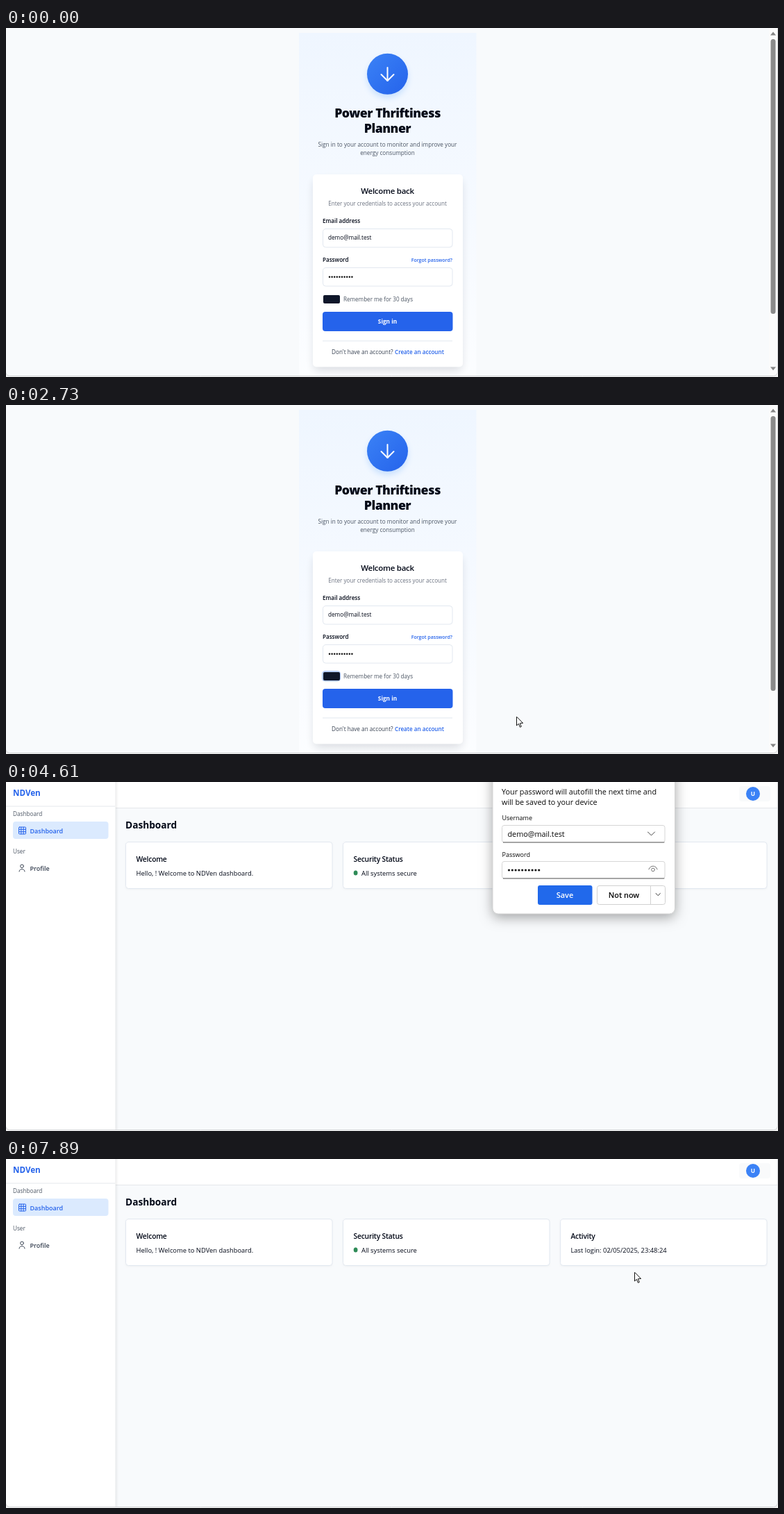
Animation, 1112 px wide and 503 px high, one loop 8 s. Source, as an HTML page with a canvas:

```html
<!DOCTYPE html>
<html lang="en">
<head>
<meta charset="utf-8">
<title>Sign in and dashboard</title>
<style>
  html, body { margin: 0; width: 100%; height: 100%; overflow: hidden; background: #f3f3f3; }
  canvas { display: block; }
</style>
</head>
<body>
<canvas id="stage" width="1112" height="503"></canvas>
<script>
const ctx = document.getElementById('stage').getContext('2d');
const LOOP = 8000;
const BRAND = 'NDVen';
const EMAIL = 'demo@mail.test';
const BLUE = '#2563eb', INK = '#020817', SLATE = '#4b5563', LINE = '#e2e8f0', PAGE = '#f8fafc';

// Pointer strokes: start, end, number of steps, waypoints
const strokes = [
  { from: 990, to: 1720, steps: 12, path: [[545, 500], [530, 440], [515, 400], [507, 432]] },
  { from: 1990, to: 2730, steps: 12, path: [[507, 432], [507, 432], [600, 445], [735, 449]] },
  { from: 2800, to: 3560, steps: 12, path: [[735, 449], [714, 395], [714, 395]] },
  { from: 4400, to: 4610, steps: 4, path: [[735, 350], [820, 190], [934, 6], [934, -30]] },
  { from: 4980, to: 5770, steps: 13, path: [[1083, 2], [1000, 50], [947, 95], [1027, 122]] },
  { from: 5820, to: 6540, steps: 11, path: [[1027, 122], [980, 95], [936, 63], [940, 66]] },
  { from: 6630, to: 7280, steps: 11, path: [[940, 66], [947, 100], [905, 163]] }
];
const clicks = [1990, 7560];
const CLICK_TIME = 200;
const BLANK_AT = 3200, DASH_AT = 3630;

const clamp = v => Math.max(0, Math.min(1, v));
const stepped = (t, from, to, steps) =>
  clamp(Math.floor((t - from) / (to - from) * (steps - 1) + 1e-6) / (steps - 1));

function pointerAt(t) {
  const s = strokes.filter(s => s.from <= t).pop();
  if (!s) return null;
  const u = stepped(t, s.from, s.to, s.steps) * (s.path.length - 1);
  const i = Math.min(Math.floor(u), s.path.length - 2);
  const [a, b] = [s.path[i], s.path[i + 1]];
  return { x: a[0] + (b[0] - a[0]) * (u - i), y: a[1] + (b[1] - a[1]) * (u - i) };
}

const inside = (p, x, y, w, h) => p && p.x >= x && p.x <= x + w && p.y >= y && p.y <= y + h;

function text(str, x, y, size, color, { weight = 400, align = 'left', track = 0 } = {}) {
  ctx.font = `${weight} ${size}px "Open Sans", "Noto Sans", sans-serif`;
  ctx.letterSpacing = track + 'px';
  ctx.textAlign = align;
  ctx.fillStyle = color;
  ctx.fillText(str, x, y);
}

function box(x, y, w, h, r, fill, stroke) {
  ctx.beginPath();
  ctx.roundRect(x, y, w, h, r);
  ctx.fillStyle = fill;
  ctx.fill();
  if (stroke) {
    ctx.strokeStyle = stroke;
    ctx.lineWidth = 1;
    ctx.stroke();
  }
}

function withShadow(color, blur, y, paint) {
  ctx.save();
  ctx.shadowColor = color;
  ctx.shadowBlur = blur;
  ctx.shadowOffsetY = y;
  paint();
  ctx.restore();
}

function rect(x, y, w, h, fill) {
  ctx.fillStyle = fill;
  ctx.fillRect(x, y, w, h);
}

function disc(x, y, r, fill, ry = r) {
  ctx.beginPath();
  ctx.ellipse(x, y, r, ry, 0, 0, 7);
  ctx.fillStyle = fill;
  ctx.fill();
}

function line(points, color, width = 1) {
  ctx.beginPath();
  points.forEach(([x, y]) => ctx.lineTo(x, y));
  ctx.strokeStyle = color;
  ctx.lineWidth = width;
  ctx.lineCap = ctx.lineJoin = 'round';
  ctx.stroke();
}

function dots(x, y, gap, r) {
  for (let i = 0; i < 10; i++) disc(x + i * gap, y, r, '#111');
}

function gradient(x0, y0, x1, y1, a, b) {
  const g = ctx.createLinearGradient(x0, y0, x1, y1);
  g.addColorStop(0, a);
  g.addColorStop(1, b);
  return g;
}

function triangle(x, y, dir) {
  ctx.beginPath();
  ctx.moveTo(x - 4, y + 2.5 * dir);
  ctx.lineTo(x + 4, y + 2.5 * dir);
  ctx.lineTo(x, y - 2.5 * dir);
  ctx.fillStyle = '#858585';
  ctx.fill();
}

function drawLogin(t, pointer) {
  const mid = 549.5;
  const center = { align: 'center' };
  rect(422, 7, 255.5, 494, gradient(0, 7, 0, 620, '#eff6ff', '#ffffff'));

  withShadow('rgba(96,165,250,.28)', 9, 5, () =>
    disc(mid, 66.3, 29.5, gradient(520, 37, 579, 96, '#3b82f6', BLUE)));
  line([[mid, 57], [mid, 76]], '#fff', 2);
  line([[540.5, 67], [mid, 76], [558.5, 67]], '#fff', 2);

  const heading = { weight: 800, align: 'center', track: -0.5 };
  text('Power Thriftiness', mid, 128.5, 17.7, INK, heading);
  text('Planner', mid, 150.5, 17.7, INK, heading);
  text('Sign in to your account to monitor and improve your', mid, 171, 8.2, SLATE, center);
  text('energy consumption', mid, 183.3, 8.2, SLATE, center);

  withShadow('rgba(15,23,42,.14)', 13, 7, () => box(444, 213, 212, 273.5, 5, '#fff'));
  box(442, 211, 216, 277.5, 5, '#fff');
  text('Welcome back', mid, 238.5, 11.5, INK, { weight: 600, align: 'center', track: -0.28 });
  text('Enter your credentials to access your account', mid, 256, 8.1, '#6b7280', center);

  text('Email address', 456, 280.5, 8.1, INK, { weight: 600 });
  box(456.5, 289.5, 186.5, 26.5, 4, '#fff', LINE);
  text(EMAIL, 464, 305, 8.2, INK);

  text('Password', 456, 337, 8.1, INK, { weight: 600 });
  text('Forgot password?', 643, 337, 7, BLUE, { weight: 600, align: 'right' });
  box(456.5, 345.5, 186.5, 26.5, 4, '#fff', LINE);
  dots(466, 358.8, 3.6, 1.25);

  if (t >= clicks[0]) box(455.5, 383.5, 26, 14.5, 4, '#c9dcfb', '#a9c5f7');
  box(457, 385, 24, 12, 2, '#0f172a');
  text('Remember me for 30 days', 486, 393.7, 8.1, SLATE);

  const hover = inside(pointer, 456, 409, 187, 28);
  box(456, 409, 187.5, 28, 4, hover ? '#1d4ed8' : BLUE);
  if (hover && t >= clicks[0]) box(456.5, 409.5, 186.5, 27, 4, '#1d4ed8', '#7d9df0');
  text('Sign in', mid, 426, 8.3, '#fff', { weight: 700, align: 'center' });

  rect(456, 450.5, 187, 1, LINE);
  text('Don\'t have an account?', 469, 470, 8.2, '#374151');
  text('Create an account', 560, 470, 8.1, BLUE, { weight: 600 });

  rect(1099, 0, 12, 501, '#fbfbfb');
  box(1101.5, 16, 7, 396, 3.5, '#8a8a8a');
  triangle(1105, 8, 1);
  triangle(1105, 491, -1);
}

function gridIcon(x, y) {
  box(x, y, 10, 10, 1, 'rgba(0,0,0,0)', BLUE);
  for (const d of [3.33, 6.67]) {
    line([[x + d, y], [x + d, y + 10]], BLUE);
    line([[x, y + d], [x + 10, y + d]], BLUE);
  }
}

function personIcon(x, y) {
  ctx.strokeStyle = '#374151';
  ctx.lineWidth = 1;
  ctx.beginPath();
  ctx.arc(x, y - 2.7, 2.3, 0, 7);
  ctx.stroke();
  ctx.beginPath();
  ctx.moveTo(x - 4, y + 5);
  ctx.bezierCurveTo(x - 4, y + 0.3, x + 4, y + 0.3, x + 4, y + 5);
  ctx.stroke();
}

function card(x, title, body, indent = 0) {
  withShadow('rgba(0,0,0,.05)', 2, 1, () => box(x + 0.5, 86.5, 297.5, 67, 4, '#fff'));
  box(x + 0.5, 86.5, 297.5, 67, 4, '#fff', LINE);
  text(title, x + 15.5, 115, 10.3, INK, { weight: 600, track: -0.2 });
  text(body, x + 15.5 + indent, 135, 9.4, INK);
}

function drawDashboard() {
  rect(158, 0, 953, 37.5, '#fff');
  rect(158, 37, 953, 1, '#e5e7eb');
  rect(157, 0, 5, 501, gradient(157, 0, 162, 0, 'rgba(0,0,0,.08)', 'rgba(0,0,0,0)'));
  rect(0, 0, 157.5, 501, '#fff');
  rect(0, 34.5, 157, 1, '#e5e7eb');

  text(BRAND, 10, 20.3, 11.6, BLUE, { weight: 700 });
  text('Dashboard', 10, 49, 8.2, SLATE);
  box(10, 57, 137.5, 25, 4, '#dbeafe');
  gridIcon(18.5, 65);
  text('Dashboard', 34.5, 73.5, 9, BLUE, { weight: 600 });
  text('User', 10, 103, 8.2, SLATE);
  personIcon(23, 124);
  text('Profile', 34.5, 127.5, 9, '#374151', { weight: 600 });

  box(1056, 6, 45, 22, 4, '#f9fafb');
  disc(1076, 17, 10, '#3b82f6');
  text('U', 1076, 20.2, 8.3, '#fff', { weight: 700, align: 'center' });

  text('Dashboard', 172, 67, 13.7, INK, { weight: 700 });
  card(172, 'Welcome', `Hello, ! Welcome to ${BRAND} dashboard.`);
  card(485, 'Security Status', 'All systems secure', 11.5);
  disc(503.6, 131, 2.9, '#2e8b57', 3.5);
  card(798, 'Activity', 'Last login: 02/05/2025, 23:48:24');
}

function field(y) {
  box(714.5, y, 234.5, 24.5, 3, '#fff', '#d6d6d6');
  line([[716, y + 24.5], [948, y + 24.5]], '#616161');
}

function drawPopup(alpha, pressed, hover) {
  ctx.save();
  ctx.globalAlpha = alpha;
  withShadow('rgba(0,0,0,.36)', 18, 5, () => box(701, -20, 262.5, 210, 8, '#fff'));
  box(701, -20, 262.5, 210, 8, '#fff', '#d4d4d4');
  const dark = '#080808';
  text('Your password will autofill the next time and', 714, 17.5, 10.8, dark);
  text('will be saved to your device', 714, 33, 10.8, dark);

  text('Username', 714.5, 55, 9, dark);
  field(62.5);
  text(EMAIL, 722.5, 78.5, 10.8, dark);
  line([[924.5, 72], [929.5, 77], [934.5, 72]], '#444');

  text('Password', 714.5, 108, 9, dark);
  field(114.5);
  dots(724.5, 127, 4.8, 1.6);
  ctx.strokeStyle = '#777';
  ctx.lineWidth = 1;
  ctx.beginPath();
  ctx.arc(932, 127.5, 6.3, Math.PI * 1.08, Math.PI * 1.92);
  ctx.stroke();
  ctx.beginPath();
  ctx.arc(932, 126.5, 2.3, 0, 7);
  ctx.stroke();

  box(766, 149, 78.5, 28, 3, '#2169eb');
  text('Save', 805, 167, 11, '#fff', { weight: 600, align: 'center' });
  box(851.5, 149.5, 98, 27, 3, '#fff', '#d1d1d1');
  if (pressed || hover) rect(852, 150, 76.5, 26, pressed ? '#858585' : '#ededed');
  rect(928, 150, 1, 26, '#d1d1d1');
  text('Not now', 890, 167, 10.9, dark, { weight: 600, align: 'center' });
  line([[936, 160.5], [939.2, 163.7], [942.4, 160.5]], '#333');
  ctx.restore();
}

function outline(points, x, y, stroke) {
  ctx.beginPath();
  points.forEach(([px, py]) => ctx.lineTo(x + px, y + py));
  ctx.closePath();
  ctx.fillStyle = '#fff';
  ctx.fill();
  ctx.strokeStyle = stroke;
  ctx.lineWidth = 1;
  ctx.lineJoin = 'round';
  ctx.stroke();
}

function drawArrow({ x, y }) {
  outline([[0.5, 0.5], [0.5, 13], [3.4, 10.4], [5.4, 15.3], [7.3, 14.5], [5.3, 9.8], [9.2, 9.5]], x, y, '#111');
}

function drawHand({ x, y }) {
  outline([[-1, 1], [1, 1], [1.3, 7], [4, 7.3], [7, 8], [9.5, 9.5], [9.5, 13], [8, 16], [8, 19],
    [0, 19], [-1, 16], [-5, 11.5], [-4, 10], [-1.2, 12]], x, y, '#1e2a5a');
  for (const dx of [1.3, 4, 7]) line([[x + dx, y + 7.5], [x + dx, y + 11]], '#1e2a5a', 0.8);
}

function popupAlpha(t) {
  return t < 7700 ? stepped(t, 3770, 4050, 5) : 1 - stepped(t, 7692, 7890, 4);
}

function draw(t) {
  const pointer = pointerAt(t);
  const click = clicks.find(c => t >= c && t < c + CLICK_TIME);
  const login = t < BLANK_AT;

  rect(0, 0, 1112, 503, '#f3f3f3');
  ctx.save();
  ctx.beginPath();
  ctx.roundRect(-0.5, -10, 1112, 511.5, 6);
  ctx.clip();
  rect(0, 0, 1112, 503, PAGE);
  if (login) drawLogin(t, pointer);
  if (t >= DASH_AT) {
    drawDashboard();
    const alpha = popupAlpha(t);
    if (alpha > 0) drawPopup(alpha, click === clicks[1], inside(pointer, 852, 150, 76, 26));
  }
  ctx.restore();

  ctx.beginPath();
  ctx.roundRect(-0.5, -10, 1112, 511.5, 6);
  ctx.strokeStyle = '#d2d3d5';
  ctx.lineWidth = 1;
  ctx.stroke();

  if (!pointer) return;
  if (click !== undefined) disc(pointer.x, pointer.y, 10, 'rgba(238,232,0,.55)');
  const overLink = inside(pointer, 456, 409, 187, 28) || inside(pointer, 560, 460, 70, 13);
  (login && overLink ? drawHand : drawArrow)(pointer);
}

function frame() {
  draw(performance.now() % LOOP);
  requestAnimationFrame(frame);
}
frame();
</script>
</body>
</html>
```
